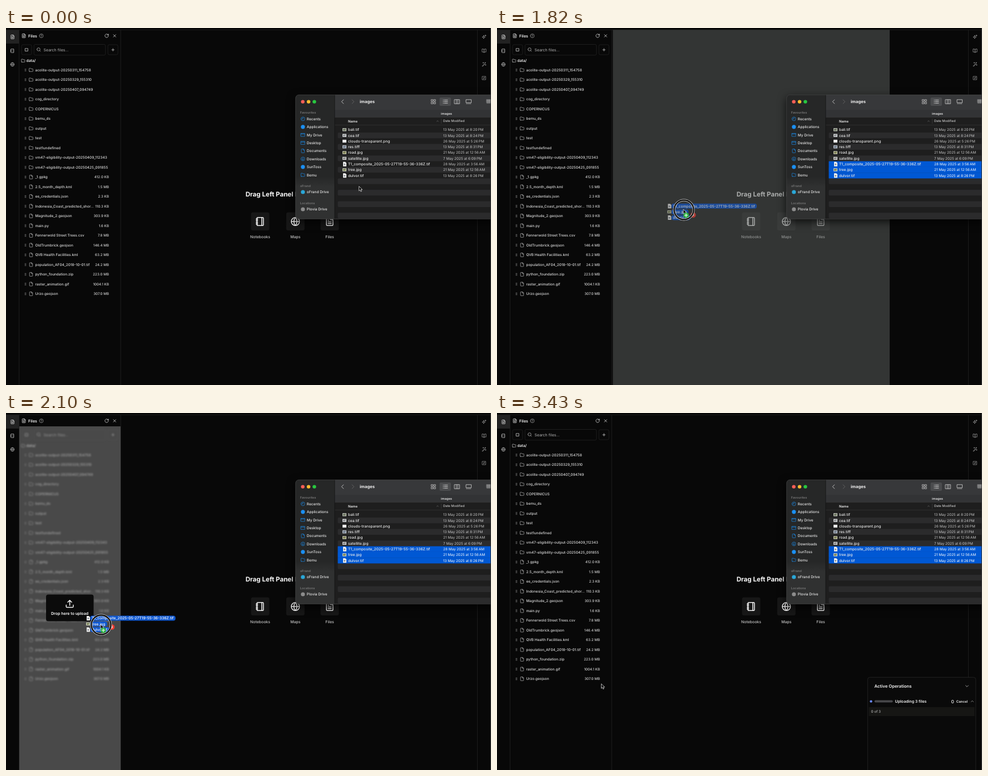
These frames come from a looping animation (872 px wide and 642 px high, 3.5 s). An HTML page:

```html
<!DOCTYPE html>
<html lang="en">
<head>
<meta charset="utf-8">
<title>Drag files to upload</title>
<style>
html, body { margin: 0; width: 100%; height: 100%; overflow: hidden; background: #080808; }
svg { display: block; width: 872px; height: 642px; }
text { font-family: Inter, Roboto, sans-serif; white-space: pre; text-rendering: geometricPrecision; }
</style>
</head>
<body>
<svg id="stage" viewBox="0 0 872 642" xmlns="http://www.w3.org/2000/svg"></svg>
<script>
const LOOP = 3500, STEP = 70;

// Icons on a 24 unit grid
const ICONS = {
  file: 'M14.5 2H6a2 2 0 0 0-2 2v16a2 2 0 0 0 2 2h12a2 2 0 0 0 2-2V7.5zM14 2v6h6',
  folder: 'M4 20h16a2 2 0 0 0 2-2V8a2 2 0 0 0-2-2h-8l-2-3H4a2 2 0 0 0-2 2v13a2 2 0 0 0 2 2z',
  globe: 'M2 12a10 10 0 1 0 20 0a10 10 0 1 0-20 0M2 12h20M12 2a15 15 0 0 1 0 20a15 15 0 0 1 0-20',
  notebook: 'M6 2h12a2 2 0 0 1 2 2v16a2 2 0 0 1-2 2H6a2 2 0 0 1-2-2V4a2 2 0 0 1 2-2M2 6h4M2 10h4M2 14h4M2 18h4M16 2v20',
  help: 'M2 12a10 10 0 1 0 20 0a10 10 0 1 0-20 0M9 9a3 3 0 0 1 6 1c0 2-3 2-3 4M12 17.5v.5',
  refresh: 'M21 12a9 9 0 1 1-3-6.7L21 8M21 3v5h-5',
  close: 'M18 6L6 18M6 6l12 12',
  search: 'M3 11a8 8 0 1 0 16 0a8 8 0 1 0-16 0M21 21l-4.3-4.3',
  plus: 'M5 12h14M12 5v14',
  square: 'M4 4h16v16H4z',
  upload: 'M3 15v4a2 2 0 0 0 2 2h14a2 2 0 0 0 2-2v-4M17 8l-5-5-5 5M12 3v13',
  down: 'M5 9l7 7 7-7',
  up: 'M5 15l7-7 7 7',
  left: 'M15 4l-8 8 8 8',
  right: 'M9 4l8 8-8 8',
  wand: 'M3 21L15 9l2 2L5 23zM18 3v4M16 5h4M8 3v4M6 5h4M20 14v4M18 16h4',
  sparkle: 'M10 5l2 6 6 2-6 2-2 6-2-6-6-2 6-2zM19 2v6M16 5h6',
  book: 'M12 7v14M12 7a4 4 0 0 0-4-4H2v15h7a3 3 0 0 1 3 3a3 3 0 0 1 3-3h7V3h-6a4 4 0 0 0-4 4',
  fn: 'M3 3h18v18H3zM9 17c2 0 3-1 3-3v-4c0-2 1-3 3-3M9 12h6',
  grid: 'M3 3h7v7H3zM14 3h7v7h-7zM3 14h7v7H3zM14 14h7v7h-7z',
  list: 'M2 5h1M7 5h15M2 12h1M7 12h15M2 19h1M7 19h15',
  columns: 'M2 4h20v16H2zM9 4v16M15 4v16',
  gallery: 'M2 4h20v12H2zM3 20h2M8 20h2M13 20h2M18 20h2',
  group: 'M2 3h5v5H2zM9.5 3h5v5h-5zM17 3h5v5h-5zM2 10h5v5H2zM9.5 10h5v5h-5zM17 10h5v5h-5zM2 18h20',
  clock: 'M2 12a10 10 0 1 0 20 0a10 10 0 1 0-20 0M12 6v6H7',
  desktop: 'M2 4h20v16H2zM2 8h20',
  arrow: 'M2 12a10 10 0 1 0 20 0a10 10 0 1 0-20 0M12 7v10M8 13l4 4 4-4'
};
ICONS.doc = ICONS.file + 'M16 13H8M16 17H8M10 9H8';

const icon = (name, x, y, size, color = '#d8d8d8', sw = 2) =>
  `<path d="${ICONS[name]}" transform="translate(${x - size / 2} ${y - size / 2}) scale(${size / 24})" fill="none" stroke="${color}" stroke-width="${sw}" stroke-linecap="round" stroke-linejoin="round"/>`;
const rect = (x, y, w, h, fill, more = '') =>
  `<rect x="${x}" y="${y}" width="${w}" height="${h}" fill="${fill}" ${more}/>`;
const dot = (x, y, r, fill, more = '') =>
  `<circle cx="${x}" cy="${y}" r="${r}" fill="${fill}" ${more}/>`;
const text = (s, x, y, size, fill = '#dcdcdc', weight = 500, anchor = 'start') =>
  `<text x="${x}" y="${y + size * 0.36}" font-size="${size}" fill="${fill}" font-weight="${weight}" text-anchor="${anchor}">${s}</text>`;
const frame = (x, y, w, h, r, fill = 'none', color = '#282828') =>
  rect(x, y, w, h, fill, `rx="${r}" stroke="${color}" stroke-width=".7"`);

const FOLDERS = ['acolite-output-20250311_154758', 'acolite-output-20250329_155310',
  'acolite-output-20250407_094749', 'cog_directory', 'COPERNICUS', 'bemu_ds', 'output', 'test',
  'test1undefined', 'vm47-eligibility-output-20250409_112343', 'vm47-eligibility-output-20250425_091855'];
const FILES = [['_1.gpkg', '412.0 KB'], ['2.5_month_depth.kml', '1.5 MB'], ['ee_credentials.json', '2.3 KB'],
  ['Indonesia_Coast_predicted_shor...', '110.3 KB'], ['Magnitude_2.geojson', '303.9 KB'], ['main.py', '1.6 KB'],
  ['Fennerwold Street Trees.csv', '7.8 MB'], ['OldTrumbrick.geojson', '146.4 MB'],
  ['QVB Health Facilities.kml', '63.2 MB'], ['population_AF04_2018-10-01.tif', '24.2 MB'],
  ['python_foundation.zip', '223.0 MB'], ['raster_animation.gif', '1004.1 KB'], ['Urzo.geojson', '307.0 MB']];
const IMAGES = [['bali.tif', '13 May 2025 at 8:20'], ['cea.tif', '13 May 2025 at 8:24'],
  ['clouds-transparent.png', '26 May 2025 at 5:26'], ['res.tiff', '13 May 2025 at 8:31'],
  ['road.jpg', '21 May 2025 at 12:56', 'AM'], ['satellite.jpg', '7 May 2025 at 6:09'],
  ['T1_composite_2025-05-27T19-55-36-336Z.tif', '28 May 2025 at 3:56', 'AM'],
  ['tree.jpg', '21 May 2025 at 12:56', 'AM'], ['dulvor.tif', '13 May 2025 at 8:26']];
const THUMBS = ['#8d9a7c', '#c8ccd0', '#f0f0f0', '#8fa0b8', '#a5a867', '#b8b8b8', '', '#a8b478', ''];
const PITCH = 10.3, NAME_SIZE = 6.66;

function treeRow(name, size, i) {
  const y = 75.5 + i * 17.5;
  let s = '';
  for (let k = 0; k < 6; k++) s += dot(34.2 + k % 2 * 1.6, y - 1.8 + (k >> 1) * 1.8, 0.55, '#a0a0a0');
  s += icon(size ? 'file' : 'folder', 45, y, 8.2, '#c4c4c4', 1.9) + text(name, 52.5, y, 6.45);
  return s + (size ? text(size, 185, y, 6.25, '#d0d0d0', 500, 'end') : '');
}

function thumb(i, x, y) {
  if (!THUMBS[i]) {
    return `<path d="M${x + 1} ${y - 4}h4l2 2v6h-6z" fill="#f2f2f2"/>` + rect(x + 2.4, y - 0.9, 2.8, 2.8, '#8a8f96');
  }
  return rect(x, y - 2.6, 7, 5.2, '#e4e4e4') + rect(x + 0.6, y - 2, 5.8, 4, THUMBS[i]) +
    (i === 2 ? '' : rect(x + 1.6, y - 0.8, 1.7, 1.9, '#444') + rect(x + 4.2, y - 1.3, 1.2, 1.6, '#555'));
}

function app() {
  let s = rect(0, 0, 872, 642, '#080808') + rect(0, 0, 872, 3, '#050505') +
    rect(0, 2.8, 872, 0.8, '#242424') + rect(0, 3.6, 23, 24.4, '#222') +
    icon('doc', 11.7, 16, 8.5, '#eee') + icon('notebook', 11.5, 41, 8, '#bbb') + icon('globe', 11.5, 65.5, 8, '#bbb');
  for (const x of [23, 205.7, 847]) s += rect(x, 3.6, 0.8, 639, '#242424');
  s += icon('sparkle', 859.5, 16, 8.5, '#aaa') + icon('book', 859.5, 41, 8.5, '#aaa') +
    icon('wand', 859.5, 65, 8.5, '#aaa') + icon('fn', 859.5, 90, 8, '#aaa');
  s += icon('doc', 32, 14, 8.5, '#eee') + text('Files', 40, 14, 7.1, '#f4f4f4', 600) +
    icon('help', 63.5, 14, 8.4, '#bbb', 1.8) + icon('refresh', 181, 14, 8.4, '#eee') + icon('close', 195.3, 14, 8.8, '#eee');
  return s;
}

function panel() {
  return frame(28, 30, 18, 18, 2.5) + icon('square', 37, 39.2, 7, '#eee', 2.4) +
    frame(50.3, 29.5, 128.5, 19.3, 2.5) + icon('search', 58.8, 38.8, 8.4, '#ccc') +
    text('Search files...', 67.5, 39.6, 7, '#b4b4b4', 400) +
    frame(183.2, 30, 18, 18, 2.5) + icon('plus', 192.3, 39.2, 8, '#eee') +
    icon('folder', 30.8, 58.8, 7.4, '#ddd') + text('data/', 36.4, 58.8, 6.8, '#eee', 600) +
    [...FOLDERS.map(n => [n]), ...FILES].map(([n, size], i) => treeRow(n, size, i)).join('');
}

function center() {
  return text('Drag Left Panel Items Here', 430.7, 298.6, 11.6, '#fafafa', 700) +
    [['notebook', 'Notebooks', 457], ['globe', 'Maps', 520.3], ['doc', 'Files', 582]].map(([ic, label, x]) =>
      rect(x - 16.5, 331.5, 33, 32.5, '#171717', 'rx="3.5"') + icon(ic, x, 348, 17.5, '#f4f4f4', 2.1) +
      text(label, x, 375.6, 6.9, '#c8c8c8', 500, 'middle')).join('');
}

function finder() {
  const blue = '#1b8ff2';
  let s = `<g style="filter:drop-shadow(0 5px 8px rgba(0,0,0,.75))">` +
    rect(520.5, 120, 370, 223.5, 'url(#vibrant)', 'rx="6"') + '</g><g clip-path="url(#win)">';
  s += rect(591, 120, 290, 224, '#1e1e1e') + rect(591, 120, 290, 27, '#37383a') +
    rect(591, 147, 290, 13.5, '#323335') + rect(591, 160.2, 290, 0.6, '#3d3d3f') +
    rect(591, 174, 290, 0.6, '#3a3a3a') + rect(590.6, 120, 0.7, 224, '#111');
  ['#ff5f57', '#febc2e', '#28c840'].forEach((c, i) => s += dot(533.6 + i * 10.4, 132.6, 3.2, c));
  s += icon('left', 605.5, 132.5, 10.5, '#d4d4d4') + icon('right', 623.5, 132.5, 10.5, '#686868') +
    text('images', 636, 132.6, 7.6, '#f0f0f0', 700) + rect(779.5, 125, 20.5, 15, '#4b4c4e', 'rx="2.5"') +
    icon('grid', 768.5, 132.5, 10, '#c4c4c4') + icon('list', 790, 132.5, 9.5, '#eee') +
    icon('columns', 811, 132.5, 11, '#c4c4c4') + icon('gallery', 832, 132.5, 11, '#c4c4c4') +
    icon('group', 868.5, 132.5, 10, '#c4c4c4', 1.5);
  s += text('images', 792, 153.5, 5.7, '#e4e4e4', 600, 'middle') + text('Name', 615, 167.4, 6.05, '#eee', 600) +
    icon('up', 776, 167.5, 5, '#aaa') + rect(782, 163, 0.6, 9, '#444') +
    text('Date Modified', 786, 167.4, 5.75, '#c8c8c8', 500);
  const side = [['clock', 'Recents'], ['', 'Applications'], ['desktop', 'My Drive'], ['desktop', 'Desktop'],
    ['file', 'Documents'], ['arrow', 'Downloads'], ['', 'SunToss'], ['folder', 'Bemu']];
  const place = (ic, label, y, color) =>
    (ic ? icon(ic, 533.8, y, 8.2, color) : dot(533.8, y, 3.6, color)) + text(label, 540.8, y, 6.5, '#e8e8e8', 500);
  s += text('Favourites', 528.7, 152.3, 5.65, '#757575', 600) + text('oFrand', 528.7, 283.8, 5.65, '#757575', 600) +
    text('Locations', 528.7, 314.6, 5.65, '#757575', 600);
  side.forEach(([ic, label], i) => s += place(ic, label, 163.4 + i * 14.4, blue));
  s += place('', 'oFrand Drive', 295, '#2aa7d8') + place('', 'Plovia Drive', 326, '#8c8c8c');
  for (let i = 1; i < 16; i += 2) s += rect(596.5, 177.7 + i * PITCH, 290, PITCH, '#2b2b2c', 'rx="2"');
  IMAGES.forEach(([name, date, half = 'PM'], i) => {
    const y = 182.9 + i * PITCH;
    s += `<g><rect class="pick" x="596.5" y="${y - PITCH / 2}" width="290" height="${PITCH + 0.1}" fill="#0058d4" visibility="hidden"/>` +
      thumb(i, 605, y) + text(name, 615, y, NAME_SIZE, '#ececec', 500) +
      `<g class="date" opacity=".74">${text(date + '\u202f' + half, 786, y, 6.4, '#fff', 400)}</g></g>`;
  });
  return s + '</g>' + rect(520.7, 120.2, 370, 223.2, 'none', 'rx="6" stroke="#4c4c4c" stroke-width=".6"');
}

function operations() {
  return frame(666.4, 475.3, 194.4, 180, 4, '#0a0a0a', '#2b2b2b') +
    text('Active Operations', 678.5, 491, 7.75, '#f4f4f4', 600) + icon('down', 845, 491, 8.5, '#ddd') +
    dot(672.5, 518.6, 2.2, '#6b8afd') + rect(678.7, 516.6, 33, 4, '#47474a', 'rx="2"') +
    text('Uploading 3 files', 715.5, 518.6, 7, '#f4f4f4', 600) + text('0', 816.4, 518.6, 8.2, '#f4f4f4', 500) +
    text('Cancel', 825.7, 518.6, 6.1, '#f0f0f0', 600) + icon('up', 854.5, 518.6, 7, '#ddd') +
    rect(668.5, 529, 190, 16, '#161614') + text('0 of 3', 672.4, 537, 6.3, '#b0b0b0', 500);
}

const ghost = () => [6, 7, 8].map((row, i) =>
  thumb(row, 0, i * PITCH) + rect(7.4, i * PITCH - 4.5, 10, 9, '#1058d0', 'rx="4" class="pill"') +
  text(IMAGES[row][0], 10, i * PITCH, NAME_SIZE, '#fff', 500)).join('') +
  dot(46.5, 16, 4.8, '#ee3b30') + text('3', 46.5, 16, 6, '#fff', 600, 'middle');

const stage = document.getElementById('stage');
stage.innerHTML = `<defs><clipPath id="win"><rect x="520.5" y="120" width="370" height="223.5" rx="6"/></clipPath>
  <clipPath id="side"><rect x="24" y="24" width="182" height="618"/></clipPath>
  <linearGradient id="vibrant" x1="0" y1="0" x2="0" y2="1">
    <stop offset=".66" stop-color="#262727"/><stop offset=".74" stop-color="#303131"/></linearGradient></defs>
  ${app()}<g clip-path="url(#side)"><g id="panel">${panel()}</g></g>${center()}
  ${rect(208.3, 3.5, 497.7, 639, 'rgb(95,99,97)', 'id="mid" opacity=".5"')}
  <g id="drop">${rect(24, 24, 182, 618, 'rgb(128,128,128)', 'opacity=".54"')}
    ${rect(72, 326.5, 85.5, 48, '#0b0b0b', 'rx="4"')}${icon('upload', 114.6, 343.2, 17, '#fff')}
    ${text('Drop here to upload', 114.6, 360.6, 7.05, '#fff', 600, 'middle')}</g>
  ${finder()}<g id="ops">${operations()}</g>${rect(871, 0, 1, 642, '#3a3a3a')}<g id="ghost">${ghost()}</g>
  <g id="ring" fill="none"><circle stroke="#dcdcdc" stroke-width="3.8"/><circle stroke="#111" stroke-width="2.4"/></g>
  <g id="cursor"><path d="M0 0v8.2l1.9-1.7 1.3 2.9 1.5-.6-1.3-2.9h2.6z" fill="#000" stroke="#f2f2f2" stroke-width=".75" stroke-linejoin="round"/>
    <g id="badge">${dot(5, 10.8, 4.9, '#2fb344')}${icon('plus', 5, 10.8, 9, '#fff', 3)}</g></g>`;

const el = id => document.getElementById(id);
const picks = [...stage.querySelectorAll('.pick')], dates = [...stage.querySelectorAll('.date')];
const rings = [...el('ring').children];
for (const pill of stage.querySelectorAll('.pill')) {
  pill.setAttribute('width', pill.nextElementSibling.getComputedTextLength() + 6);
}

// [time, x, y]
const PATH = [[0, 634.7, 284.7], [70, 634.7, 284.7], [140, 640, 288], [280, 640, 288], [560, 638, 274],
  [770, 636.7, 249.5], [840, 637, 248.3], [1610, 637, 248.5], [1680, 565, 268], [1750, 470, 293],
  [1820, 335, 326], [1890, 243, 345], [1960, 213, 356], [2100, 170, 380], [2170, 158, 401],
  [2450, 141, 473], [2590, 141, 487], [3290, 141, 487], [3430, 187.6, 487]];
const LAG = [[1680, -32, -5], [1890, -27, -6], [2100, -26, -11], [2450, -30.5, -9]];
// [start, end, radius]
const PRESS = [[420, 910, 10], [1120, 1400, 10], [1540, 1680, 10], [1680, 2800, 17.5]];
// When each of the last three rows gets selected
const SELECT = { 6: 840, 7: 700, 8: 560 };

function at(keys, t) {
  const i = keys.findIndex(k => k[0] > t);
  if (i < 0) return keys[keys.length - 1].slice(1);
  if (i === 0) return keys[0].slice(1);
  const a = keys[i - 1], b = keys[i], f = (t - a[0]) / (b[0] - a[0]);
  return [a[1] + (b[1] - a[1]) * f, a[2] + (b[2] - a[2]) * f];
}
const show = (node, on) => node.setAttribute('visibility', on ? 'visible' : 'hidden');
const move = (node, x, y) => node.setAttribute('transform', `translate(${x} ${y})`);

function draw(ms) {
  const t = Math.floor(ms % LOOP / STEP) * STEP;
  const [x, y] = at(PATH, t), [dx, dy] = at(LAG, t);
  const dragging = t >= 1680 && t < 2800, dropping = t >= 2030 && t < 2800;
  move(el('cursor'), x, y);
  move(el('ghost'), x + dx, y + dy);
  show(el('ghost'), dragging);
  el('ghost').setAttribute('opacity', t < 2030 ? 0.65 : 1);
  show(el('badge'), t >= 1750 && dragging);
  show(el('mid'), t >= 1750 && t < 2030);
  show(el('drop'), dropping);
  el('panel').style.filter = dropping ? 'blur(1.7px)' : 'none';
  el('ops').setAttribute('opacity', t < 2870 ? 0 : t < 2940 ? 0.6 : 1);
  const press = PRESS.find(p => t >= p[0] && t < p[1]);
  show(el('ring'), press);
  move(el('ring'), x + 1, y + 1);
  if (press) rings.forEach(r => r.setAttribute('r', press[2]));
  picks.forEach((p, i) => {
    const on = t >= (SELECT[i] ?? Infinity);
    show(p, on);
    dates[i].setAttribute('opacity', on ? 1 : 0.74);
  });
}

const start = performance.now();
function tick() {
  draw(performance.now() - start);
  requestAnimationFrame(tick);
}
tick();
</script>
</body>
</html>
```
